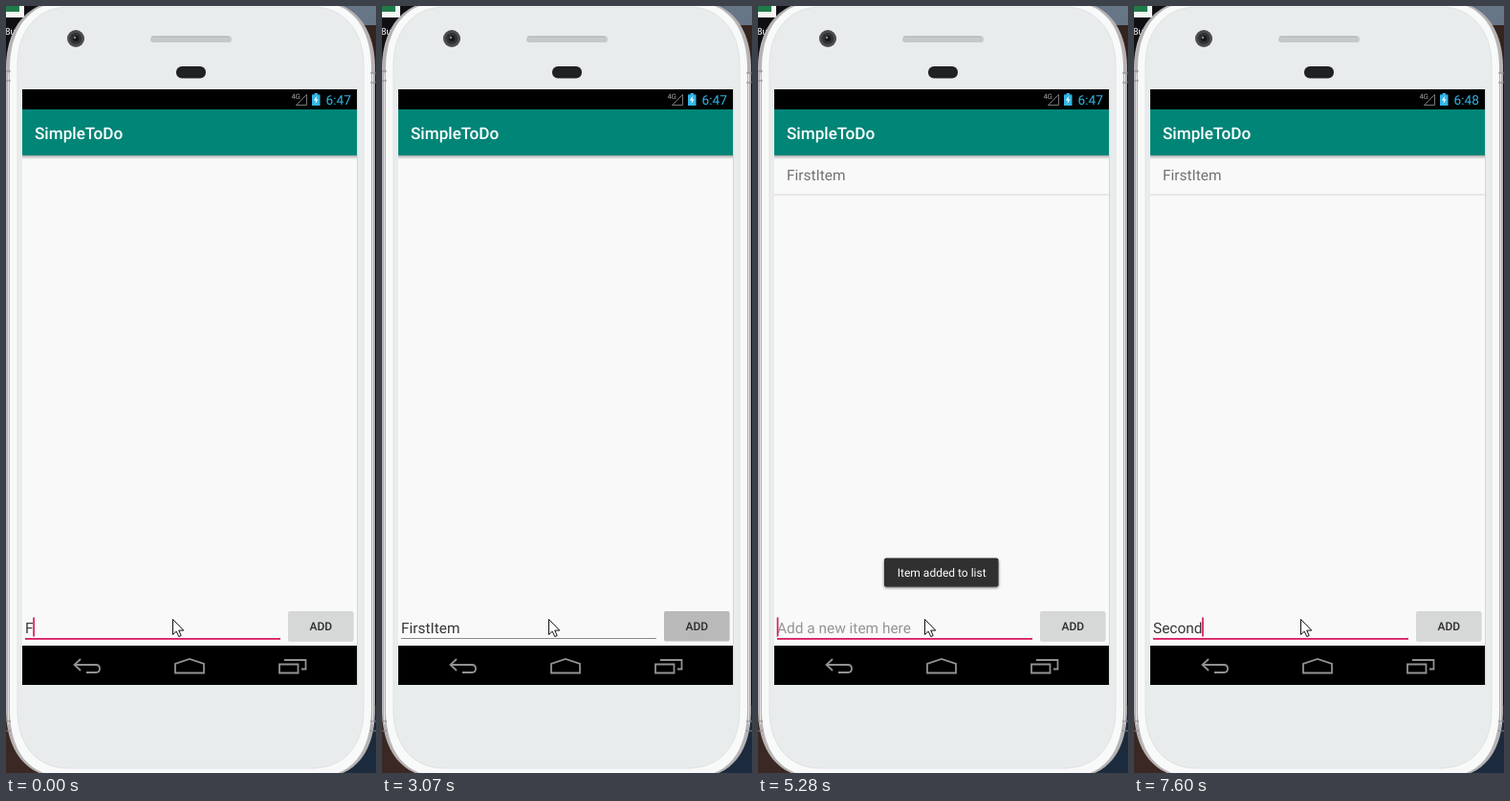
An HTML page that plays this animation: 387x801 px, repeating every 8000 ms.

```html
<!DOCTYPE html>
<html lang="en">
<head>
<meta charset="utf-8">
<title>To-do app</title>
<style>
html, body { margin: 0; width: 100%; height: 100%; overflow: hidden; background: #0b0d12; }
svg { display: block; width: 387px; height: 801px; font-family: Roboto, "Noto Sans", sans-serif; text-rendering: geometricPrecision; }
text { white-space: pre; }
</style>
</head>
<body>
<svg viewBox="0 0 387 801">
  <defs>
    <linearGradient id="shade" x2="0" y2="1">
      <stop stop-color="#000" stop-opacity=".32"/>
      <stop offset="1" stop-color="#000" stop-opacity="0"/>
    </linearGradient>
    <filter id="soft" x="-20%" y="-40%" width="140%" height="180%"><feGaussianBlur stdDeviation="1.8"/></filter>
  </defs>

  <!-- desktop corners -->
  <rect width="60" height="80" fill="#101014"/>
  <rect width="19" height="12" fill="#f4f6f4"/>
  <rect width="14" height="6" fill="#1f7a48"/>
  <text x="-1" y="30" font-size="10" fill="#fff">8u</text>
  <rect x="330" width="57" height="20" fill="#667686"/>
  <rect x="330" y="20" width="57" height="60" fill="#33241f"/>
  <rect y="730" width="60" height="71" fill="#3b2723"/>
  <rect x="330" y="730" width="57" height="71" fill="#1b2a3c"/>

  <!-- phone body -->
  <path d="M40-2C20 4 1 24 0 62V738C1 772 15 795 40 803H347C372 795 385 772 386 738V62C385 24 367 4 347-2Z" fill="#b7b3b4"/>
  <path d="M42-1C22 5 5 26 4 62V738C5 772 18 794 42 802H345C368 794 381 772 382 738V62C381 26 365 5 345-1Z" fill="#f8f9f9"/>
  <path d="M2.500 70V750M383.500 70V750" stroke="#e3e0e1"/>
  <path d="M0 68H5M0 78H5M381 70H387M381 80H387M0 747H5M0 757H5M381 747H387M381 757H387" stroke="#89868a"/>
  <path d="M62 1C32 3 12 26 12 62V735C12 772 32 796 66 796H320C354 796 374 772 374 735V62C374 26 354 3 324 1Z" fill="#e9ecec" stroke="#dfe2e2"/>
  <rect x="151" y="31.500" width="85" height="6.500" rx="3.200" fill="#c6c9c9"/>
  <path d="M153 32H234" stroke="#aeb2b2"/>
  <circle cx="73" cy="34" r="9" fill="#4a4b4d"/>
  <circle cx="73" cy="34" r="6" fill="#303133"/>
  <circle cx="73" cy="34" r="3" fill="#141516"/>
  <circle cx="72" cy="33" r="1.300" fill="#83878a"/>
  <rect x="178" y="63" width="31" height="12.500" rx="6" fill="#202124"/>

  <!-- screen -->
  <rect x="17" y="87" width="350" height="622"/>
  <rect x="17" y="155" width="350" height="513" fill="#f9f9f9"/>
  <rect x="17" y="108" width="350" height="48" fill="#008577"/>
  <rect x="17" y="156" width="350" height="4" fill="url(#shade)"/>
  <path d="M367.500 87V709" stroke="#d4d7d7"/>
  <text x="30" y="138.500" font-size="17.140" font-weight="500" fill="#fff">SimpleToDo</text>

  <!-- status bar -->
  <text x="298.500" y="97" font-size="7.500" fill="#aaa">4G</text>
  <path d="M303.500 103.500H314.500V92.500Z" fill="none" stroke="#777"/>
  <path d="M320 92.500H322.500V91H326V92.500H328.500V104H320Z" fill="#33b5e5"/>
  <path d="M325 94L322 98.500H324L323.500 102L326.500 97.500H324.500Z" fill="#fff"/>
  <text id="clock" x="334.500" y="102.800" font-size="13.710" fill="#33b5e5"></text>

  <!-- navigation bar -->
  <g fill="none" stroke="#929292" stroke-width="1.800">
    <path d="M78 682L71.500 688L78 694M72 688H94Q98 688 98 692T94 696H84"/>
    <path d="M177 696.500V687L192 682L207 687V696.500Z"/>
    <path d="M286 687.500H305.500V696.500H286ZM291 683H313.500V692.500H309"/>
  </g>

  <!-- list -->
  <g id="item">
    <text x="30" y="182" font-size="15.430" fill="#717171">FirstItem</text>
    <rect x="17" y="196.500" width="350" height="1.200" fill="#dcdcdc"/>
  </g>

  <!-- input row -->
  <text id="entry" x="20" y="654.500" font-size="15.430"></text>
  <rect id="line" x="20" width="267"/>
  <rect id="caret" y="638.500" width="1.700" height="20" fill="#d81b60"/>
  <rect x="295" y="633" width="68.500" height="31" rx="2" fill="#000" opacity=".12"/>
  <rect id="button" x="295" y="632" width="68.500" height="31" rx="1.800"/>
  <text x="317.500" y="652" font-size="12" font-weight="500" fill="#2c2c2c">ADD</text>

  <g id="toast">
    <rect x="132" y="578.500" width="119.500" height="29" rx="2" opacity=".6" filter="url(#soft)"/>
    <rect x="132" y="576.500" width="119.500" height="30" rx="2" fill="#303030"/>
    <text x="145.800" y="596" font-size="12" fill="#fff">Item added to list</text>
  </g>

  <path d="M174.500 640.500V656.500L178.200 653.100L180.800 658.600L183.200 657.500L180.700 652.100H185.800Z" fill="#fff" stroke="#111"/>
</svg>
<script>
const $ = id => document.getElementById(id);
const set = (id, attrs) => { for (const k in attrs) $(id).setAttribute(k, attrs[k]); };

// [start in ms, typed text]; a trailing "|" shows the caret
const typing = [
  [0, "F|"], [280, "Fi|"], [740, "Fi"], [890, "F|"], [1040, "Fi"], [1440, "Fir|"],
  [1590, "Firs|"], [1710, "First|"], [2270, "FirstI|"], [2390, "FirstIt|"],
  [2510, "FirstIte|"], [2640, "FirstItem|"], [3070, "FirstItem"], [3730, ""],
  [5280, "|"], [5800, ""], [6320, "|"], [6780, "S|"], [6930, "Se|"],
  [7080, "Sec|"], [7330, "Secon|"], [7600, "Second|"]
];
const fade = [
  [0, 0], [3730, .12], [3860, .42], [4010, .74], [4160, .94], [4320, 1],
  [5920, .8], [6070, .44], [6200, .13], [6320, 0]
];
const at = (steps, t) => steps.findLast(s => s[0] <= t)[1];

function draw() {
  const t = performance.now() % 8000;
  const state = at(typing, t), text = state.replace("|", "");
  const away = t >= 3070 && t < 5280;

  $("entry").textContent = text || "Add a new item here";
  set("entry", { fill: text ? "#383838" : "#949494" });
  const end = text ? $("entry").getComputedTextLength() : 0;
  set("caret", { x: 19.7 + end, opacity: state.endsWith("|") ? 1 : 0 });
  set("line", away ? { y: 660, height: 1, fill: "#8c8c8c" } : { y: 660, height: 1.8, fill: "#d81b60" });
  set("button", { fill: away ? "#b9b9b9" : "#d6d7d7" });
  set("item", { opacity: t < 3730 ? 0 : 1 });
  set("toast", { opacity: at(fade, t) });
  $("clock").textContent = t < 5800 ? "6:47" : "6:48";
  requestAnimationFrame(draw);
}
draw();
</script>
</body>
</html>
```
